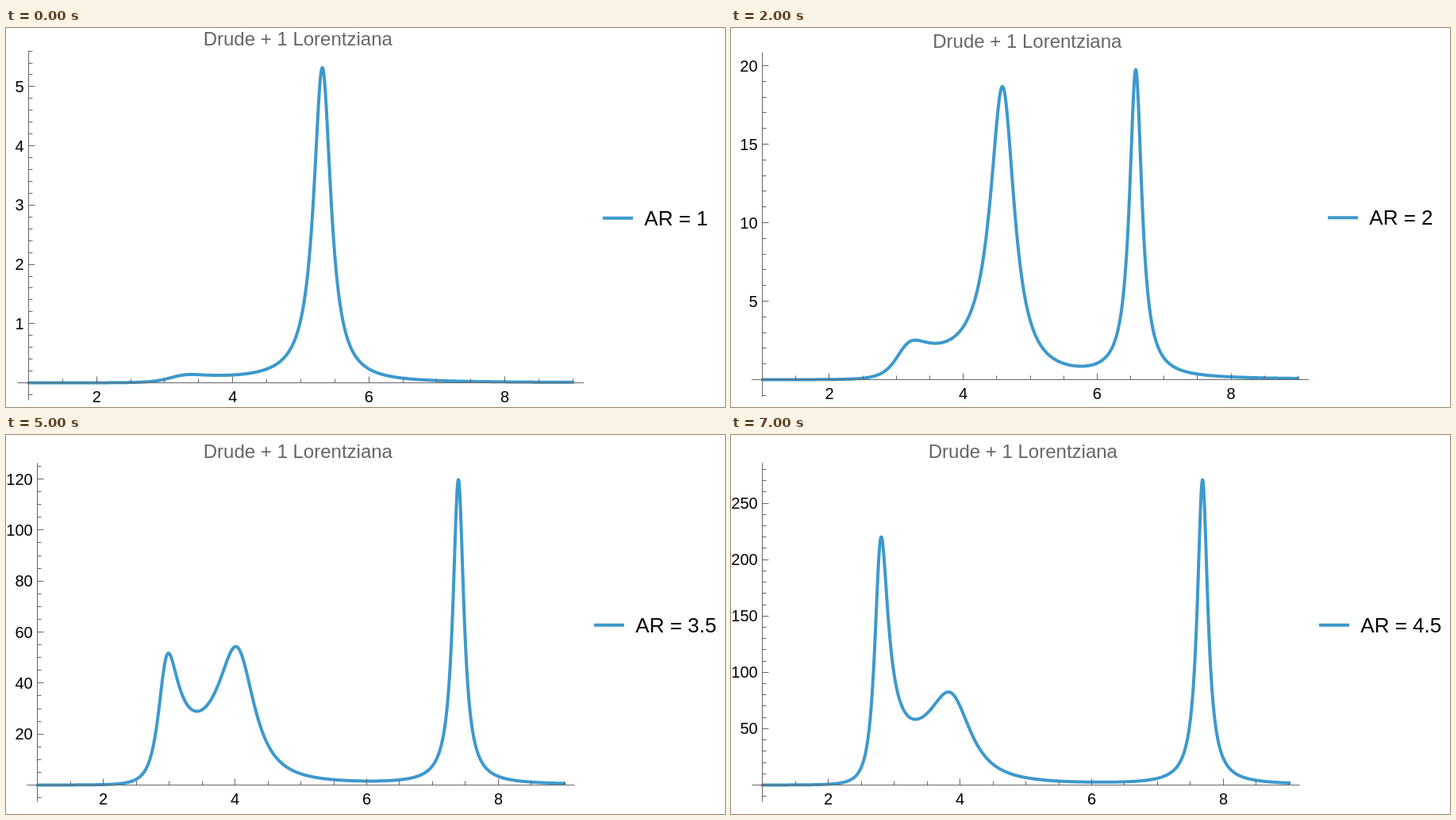
An HTML page with a canvas that plays this animation: 906 by 478 pixels, repeating every 8 s.

```html
<!DOCTYPE html>
<html>
<head>
<meta charset="utf-8">
<style>
html, body { margin: 0; width: 100%; height: 100%; overflow: hidden; background: #fff; }
canvas { display: block; }
</style>
</head>
<body>
<canvas id="plot" width="906" height="478"></canvas>
<script>
const ctx = document.getElementById('plot').getContext('2d');
const BLUE = '#3d99cc', GREY = '#666';

// Per aspect ratio: plotted maximum, major tick step, minor tick step
const STATES = [
  [1, 5.32, 1, 0.2], [1.5, 9.97, 2, 0.5], [2, 19.75, 5, 1], [2.5, 40.7, 10, 2],
  [3, 73.1, 20, 5], [3.5, 119.7, 20, 5], [4, 184.5, 50, 10], [4.5, 270.8, 50, 10],
];
// Per digit count of the y labels: baseline, curve height, title baseline
const LAYOUT = { 1: [447.5, 397.5, 21.7], 2: [443.5, 391, 24.8], 3: [441.5, 385, 28.5] };

// Depolarisation factor along the short axis of an oblate spheroid
function depolarisation(ratio) {
  if (ratio === 1) return 1 / 3;
  const e2 = 1 - 1 / ratio ** 2;
  return (1 - Math.acos(1 / ratio) / ratio / Math.sqrt(e2)) / e2;
}

// Drude + Lorentz susceptibility, absorbed along one short and two long axes
function absorption(w, short) {
  const drude = 69.67, damping = 0.02, strength = 9.1, centre = 12.6, width = 1.03;
  const u = w * w;
  const d1 = u * u + damping * damping * u;
  const d2 = (centre - u) ** 2 + width * width * u;
  const re = -drude * u / d1 + strength * (centre - u) / d2;
  const im = drude * damping * w / d1 + strength * width * w / d2;
  const mode = L => w * im / ((1 + L * re) ** 2 + (L * im) ** 2);
  return mode(short) + 2 * mode((1 - short) / 2);
}

function sampleCurve(ratio) {
  const short = depolarisation(ratio), points = [];
  for (let i = 0; i <= 1600; i++) points.push(absorption(1 + i / 200, short));
  const max = Math.max(...points);
  return points.map(v => v / max);
}
const curves = STATES.map(([ratio]) => sampleCurve(ratio));

const crisp = v => Math.floor(v) + 0.5;

function line(x1, y1, x2, y2, color = GREY, width = 1) {
  ctx.strokeStyle = color;
  ctx.lineWidth = width;
  ctx.beginPath();
  ctx.moveTo(x1, y1);
  ctx.lineTo(x2, y2);
  ctx.stroke();
}

function text(str, x, y, size, align, color = '#000') {
  ctx.font = size + 'px "Liberation Sans", Arial, sans-serif';
  ctx.textAlign = align;
  ctx.fillStyle = color;
  ctx.fillText(str, x, y);
}

function draw(index) {
  const [ratio, peak, major, minor] = STATES[index];
  const digits = String(Math.floor(peak / major) * major).length;
  const [base, rise, titleY] = LAYOUT[digits];
  const shift = ratio % 1 ? 11 : 0;
  const left = 17.4 + 11.1 * digits - shift, right = 714.4 - shift;
  const scaleX = (right - left) / 8, unit = rise / peak;
  const padX = (right - left) * 0.02, padY = rise * 0.055;
  const axisX = crisp(left);

  ctx.fillStyle = '#fff';
  ctx.fillRect(0, 0, 906, 478);
  text('Drude + 1 Lorentziana', (left + right) / 2 - 3.7, titleY, 24, 'center', GREY);

  ctx.strokeStyle = BLUE;
  ctx.lineWidth = 4;
  ctx.lineJoin = ctx.lineCap = 'round';
  ctx.beginPath();
  curves[index].forEach((v, i) => ctx.lineTo(left + i / 200 * scaleX, base - v * rise));
  ctx.stroke();
  ctx.lineCap = 'butt';

  line(left - padX, base, right + padX, base);
  line(axisX, base - rise - padY, axisX, base + padY);
  for (let v = 1; v <= 9; v += 0.5) {
    const x = left + (v - 1) * scaleX, labelled = v % 2 === 0;
    line(crisp(x), base, crisp(x), base - (labelled ? 8 : 5));
    if (labelled) text(v, x, base + 24, 20, 'center');
  }
  const perMajor = Math.round(major / minor);
  const first = Math.ceil(-padY / unit / minor), last = Math.floor((rise + padY) / unit / minor);
  for (let k = first; k <= last; k++) {
    const y = base - k * minor * unit, labelled = k % perMajor === 0;
    line(axisX, crisp(y), axisX + (labelled ? 8 : 5), crisp(y));
    if (labelled && k) text(k / perMajor * major, left - 6, y + 7, 20, 'right');
  }

  const legendY = digits === 2 ? 239.3 : 239.8;
  line(752 - shift, legendY, 790 - shift, legendY, BLUE, 4);
  text('AR = ' + ratio, 804.3 - shift, legendY + 9, 26, 'left');
}

function tick() {
  draw(Math.floor(performance.now() % 8000 / 1000));
  requestAnimationFrame(tick);
}
tick();
</script>
</body>
</html>
```
